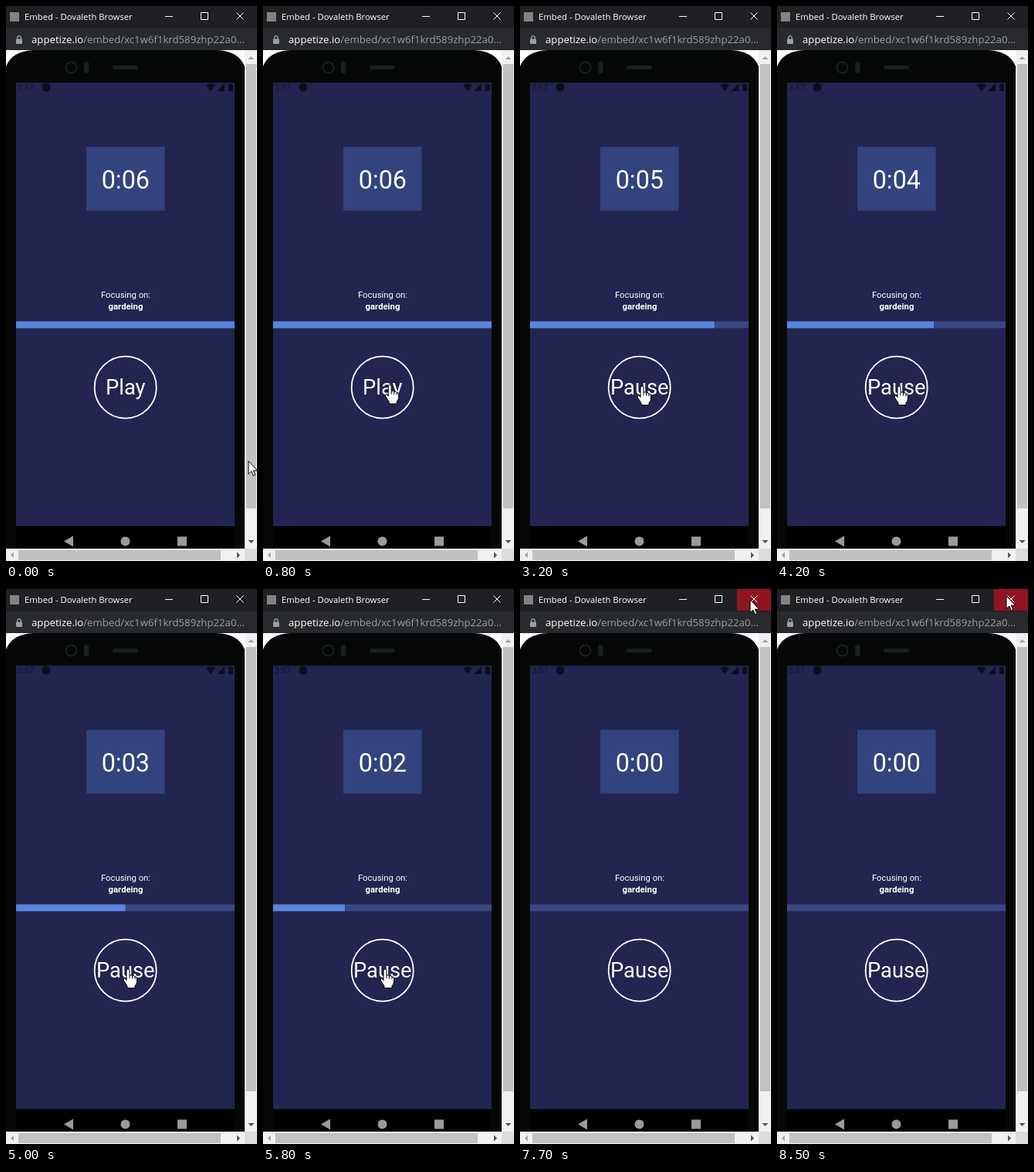
Write an HTML page that moves like this. It is 325x717 px and loops after 8600 ms.

```html
<!DOCTYPE html>
<html lang="en">
<head>
<meta charset="utf-8">
<title>Focus timer</title>
<style>
  html, body { margin: 0; width: 100%; height: 100%; overflow: hidden; background: #fff; }
  svg { display: block; width: 100%; height: 100%; }
  .ui { font-family: "Open Sans", "Noto Sans", sans-serif; }
  .app { font-family: Roboto, sans-serif; fill: #fff; text-anchor: middle; }
  .line { fill: none; stroke: #fff; }
</style>
</head>
<body>
<svg viewBox="0 0 325 717" preserveAspectRatio="none">
  <defs>
    <clipPath id="screen"><rect x="13" y="99" width="283" height="573"/></clipPath>
  </defs>

  <!-- page and phone -->
  <rect width="325" height="717" fill="#fff"/>
  <path d="M0 701V78Q8 58 36 57H273Q301 58 309 78V701Z" fill="#050807"/>
  <g fill="#1c1f1f">
    <circle cx="84.500" cy="79.500" r="7" fill="none" stroke="#1c1f1f" stroke-width="2"/>
    <rect x="101" y="72" width="6.500" height="15" rx="3"/>
    <rect x="138" y="77" width="33" height="5" rx="2.500"/>
  </g>
  <rect x="13" y="99" width="283" height="573" fill="#22254f"/>
  <rect x="13" y="672" width="283" height="29" fill="#000"/>

  <!-- status bar -->
  <g fill="#0c0e20">
    <text x="15" y="109" font-size="11" font-family="Roboto, sans-serif" fill="#13152c">3:57</text>
    <circle cx="52" cy="105" r="5.500"/>
    <path d="M259 102.500Q265 98 271 102.500L265 110Z"/>
    <path d="M283 100V110H273Z"/>
    <path d="M288 101H290V100H292V101H294V110H288Z"/>
  </g>

  <!-- timer app -->
  <rect x="104" y="182" width="101.500" height="82.500" fill="#32437e"/>
  <text id="clock" class="app" x="154.800" y="236" font-size="32.300">0:06</text>
  <text class="app" x="155" y="376.500" font-size="11.300">Focusing on:</text>
  <text class="app" x="155" y="391.500" font-size="11.300" font-weight="700">gardeing</text>
  <g clip-path="url(#screen)">
    <rect x="9" y="407.500" width="291" height="8.700" fill="#394884"/>
    <rect id="bar" x="9" y="407.500" width="291" height="8.700" fill="#5b84df"/>
  </g>
  <circle class="line" cx="154.700" cy="492.700" r="40" stroke-width="1.800"/>
  <text id="button" class="app" x="154.800" y="501.500" font-size="27.300">Play</text>

  <!-- navigation keys -->
  <g fill="#9a9a9a">
    <path d="M75 691.500L87 684.500V698.500Z"/>
    <circle cx="154.500" cy="691.500" r="6"/>
    <rect x="222" y="685.500" width="12" height="12"/>
  </g>

  <!-- scrollbars -->
  <rect x="309" y="57" width="16" height="644" fill="#f1f1f1"/>
  <rect y="701" width="309" height="16" fill="#f1f1f1"/>
  <rect x="309" y="701" width="16" height="16" fill="#dcdcdc"/>
  <g fill="#c1c1c1">
    <rect x="311" y="75" width="13" height="574"/>
    <rect x="16" y="703" width="262" height="13"/>
  </g>
  <g fill="#a3a3a3">
    <path d="M313.500 69L317.500 65L321.500 69Z"/>
    <path d="M10 705.500L6 709.500L10 713.500Z"/>
  </g>
  <g fill="#505050">
    <path d="M313.500 690L317.500 694L321.500 690Z"/>
    <path d="M299 705.500L303 709.500L299 713.500Z"/>
  </g>

  <!-- window chrome -->
  <rect width="325" height="29" fill="#1f2024"/>
  <rect y="29" width="325" height="28" fill="#292a2e"/>
  <rect x="5" y="8" width="12" height="12" fill="#85827f"/>
  <text class="ui" x="24" y="18" font-size="11.300" fill="#fff">Embed - Dovaleth Browser</text>
  <rect id="closeHover" x="281" width="44" height="28" fill="#901522"/>
  <path class="line" d="M206 13.500H216M252.500 8.500H261.500V17.500H252.500ZM298.500 8.500L307.500 17.500M307.500 8.500L298.500 17.500"/>
  <rect x="13" y="42.500" width="8" height="6.500" rx="1" fill="#9aa0a6"/>
  <path d="M14.700 43V41Q14.700 38.700 17 38.700T19.300 41V43" fill="none" stroke="#9aa0a6" stroke-width="1.300"/>
  <text class="ui" x="33" y="48" font-size="13.200" fill="#9aa0a6"><tspan fill="#fff">appetize.io</tspan>/embed/xc1w6f1krd589zhp22a0...</text>

  <!-- pointers, hot spot at 0,0 -->
  <g fill="#fff" stroke="#000" stroke-width="1" stroke-linejoin="round">
    <path id="arrow" d="M0 0V16.500L3.800 13L6.300 18.800L8.700 17.800L6.200 12.200H11.700Z"/>
    <g id="hand">
      <path d="M-2 2Q-2 0 0 0T2 2V8Q4.500 7 5.500 9Q8 8 9 10Q11.500 9.500 11.500 12.500V17Q11 20 9 21.500V24.500H-1V22L-5.500 15Q-6.500 12.500-4.500 12.200Q-3.200 12.500-2 14.500Z"/>
      <path d="M2 8V12M5.500 9V12.500M9 10V13" fill="none"/>
    </g>
  </g>
</svg>

<script>
  const LOOP = 8600;
  const PRESS = 1200;
  const FIRST_TICK = 2220;
  const SECONDS = 6;
  const SLIDE = 180;
  const BAR_WIDTH = 291;

  // Pointer stops: time, x, y
  const stops = [
    [0, 314, 588], [900, 159, 486], [1600, 159, 487], [1800, 158, 491],
    [6150, 158, 491], [7000, 302, 20], [7100, 300, 21], [7500, 298, 14],
    [8000, 298, 14], [8200, 297, 9], [LOOP, 297, 9]
  ];

  const byId = id => document.getElementById(id);
  const clamp = v => Math.min(1, Math.max(0, v));
  const ease = v => v * v * (3 - 2 * v);
  const show = (node, on) => node.setAttribute("visibility", on ? "visible" : "hidden");

  const clock = byId("clock"), bar = byId("bar"), button = byId("button");
  const arrow = byId("arrow"), hand = byId("hand"), closeHover = byId("closeHover");

  function pointerAt(t) {
    const i = stops.findIndex(s => s[0] > t);
    const [t0, x0, y0] = stops[i - 1], [t1, x1, y1] = stops[i];
    const k = ease((t - t0) / (t1 - t0));
    return [x0 + (x1 - x0) * k, y0 + (y1 - y0) * k];
  }

  function draw(t) {
    const elapsed = t - FIRST_TICK;
    const ticks = Math.min(SECONDS, Math.max(0, Math.floor(elapsed / 1000) + 1));
    const slide = ticks ? ease(clamp((elapsed - (ticks - 1) * 1000) / SLIDE)) : 1;
    const left = SECONDS - ticks + 1 - slide;

    clock.textContent = "0:0" + (SECONDS - ticks);
    bar.setAttribute("width", BAR_WIDTH * left / SECONDS);
    button.textContent = t < PRESS ? "Play" : "Pause";

    const [x, y] = pointerAt(t);
    const onScreen = x > 13 && x < 296 && y > 99 && y < 672;
    const pointer = onScreen ? hand : arrow;
    pointer.setAttribute("transform", `translate(${x} ${y})`);
    show(hand, onScreen);
    show(arrow, !onScreen);
    show(closeHover, x > 281 && y < 28);
  }

  const start = performance.now();
  function frame() {
    draw((performance.now() - start) % LOOP);
    requestAnimationFrame(frame);
  }
  frame();
</script>
</body>
</html>
```
